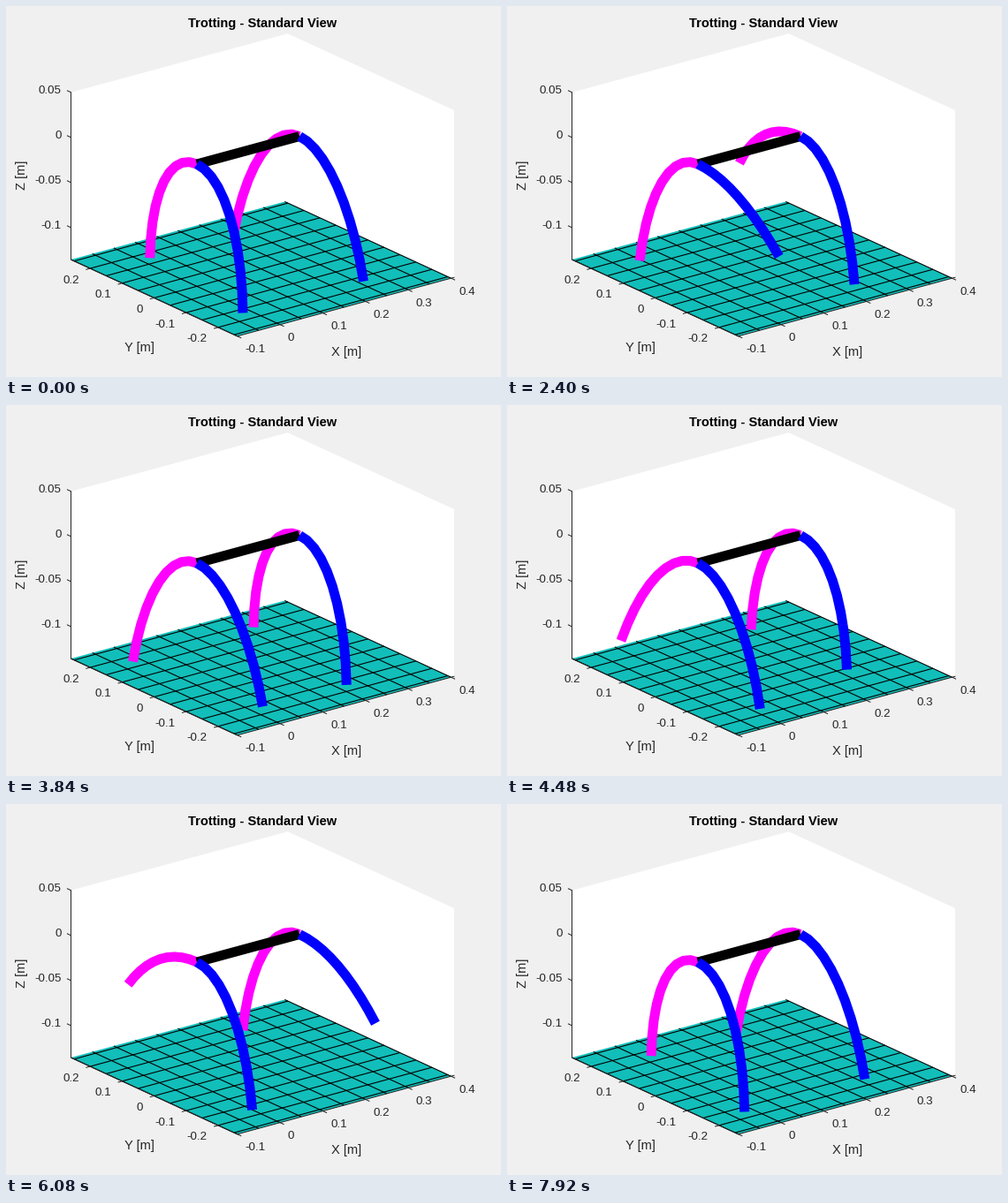
Animation of 560x420 px, one loop 8 s. Source, as a matplotlib script:

```python
import numpy as np
import matplotlib.pyplot as plt
from matplotlib.animation import FuncAnimation

W, H, DPI = 560, 420, 80
PT = 72 / DPI  # points per pixel
FRAMES, INTERVAL = 100, 80

# Plot box: a unit cube seen from azimuth -37.5, elevation 30, stretched to fit
X_LIM, Y_LIM, Z_LIM = (-0.1, 0.407), (-0.26, 0.26), (-0.1355, 0.05)
AZ, EL = np.radians([37.5, 30])
LEFT, TOP, BOX_W, BOX_H = 73.5, 31.2, 433.4, 342.6
SX = BOX_W / (np.cos(AZ) + np.sin(AZ))
SY = BOX_H / ((np.cos(AZ) + np.sin(AZ)) * np.sin(EL) + np.cos(EL))
EX = SX * np.cos(AZ), -SY * np.sin(AZ) * np.sin(EL)
EY = -SX * np.sin(AZ), -SY * np.cos(AZ) * np.sin(EL)
EZ = -SY * np.cos(EL)
FRONT = LEFT - EY[0], TOP + BOX_H

# Robot, in metres
BODY, LEG = 0.24, 0.238
HEIGHT, LIFT = 0.135, 0.073
STRIDE, SWEEP = 0.0207, 0.027
SEGMENTS = 10
BENDS = np.linspace(0.01, 2, 400)
DROPS = LEG * (1 - np.cos(BENDS)) / BENDS

INK, TEAL = "#262626", "#12beb9"
MAGENTA, BLUE = "#ff00ff", "#0000ff"


def project(x, y, z):
    a = (np.asarray(x) - X_LIM[0]) / (X_LIM[1] - X_LIM[0])
    b = (np.asarray(y) - Y_LIM[0]) / (Y_LIM[1] - Y_LIM[0])
    c = (np.asarray(z) - Z_LIM[0]) / (Z_LIM[1] - Z_LIM[0])
    return (FRONT[0] + a * EX[0] + b * EY[0],
            FRONT[1] + a * EX[1] + b * EY[1] + c * EZ)


fig = plt.figure(figsize=(W / DPI, H / DPI), dpi=DPI, facecolor="#f0f0f0")
ax = fig.add_axes([0, 0, 1, 1])
ax.set_xlim(0, W)
ax.set_ylim(H, 0)
ax.axis("off")


def line(xs, ys, color, width, z, cap="butt"):
    return ax.plot(xs, ys, color=color, lw=width * PT, zorder=z,
                   solid_capstyle=cap, solid_joinstyle="round")[0]


def label(x, y, text, size=13.33, color=INK, **kw):
    ax.text(x, y, text, fontsize=size * PT, color=color,
            family="Liberation Sans", zorder=9, **kw)


def tick(point, along):
    d = np.array(along) / np.hypot(*along) * 5
    line([point[0], point[0] + d[0]], [point[1], point[1] + d[1]], INK, 1, 3)


def draw_box():
    (x0, x1), (y0, y1), (z0, z1) = X_LIM, Y_LIM, Z_LIM
    walls = project([x0, x0, x1, x1, x1, x0], [y1, y1, y1, y0, y0, y0],
                    [z0, z1, z1, z1, z0, z0])
    ax.fill(*walls, color="white", lw=0, zorder=0)

    # The ground runs past the box in y, so its y edges carry no grid line
    x_end = 0.4
    floor = project([x0, x_end, x_end, x0], [y0, y0, y1, y1], [z0] * 4)
    ax.fill(*floor, color=TEAL, lw=0, zorder=1)
    for x in np.linspace(x0, x_end, 11):
        line(*project([x, x], [y0, y1], [z0, z0]), "black", 1.1, 2)
    for y in np.linspace(-0.25, 0.25, 11):
        line(*project([x0, x_end], [y, y], [z0, z0]), "black", 1.1, 2)

    line(*project([x0, x0, x0, x1], [y1, y1, y0, y0], [z1, z0, z0, z0]),
         INK, 1, 3, "projecting")


def draw_labels():
    x0, y0 = X_LIM[0], Y_LIM[0]
    z0 = Z_LIM[0]
    for x in np.arange(-1, 5) / 10:
        p = project(x, y0, z0)
        tick(p, (-EY[0], -EY[1]))
        label(p[0] + 8.7, p[1] + 15.5, f"{x:g}", ha="left", va="center")
    for y in np.arange(-2, 3) / 10:
        p = project(x0, y, z0)
        tick(p, (-EX[0], -EX[1]))
        label(p[0] - 12.5, p[1] + 13.5, f"{y:g}", ha="right", va="center")
    for z in (0.05, 0, -0.05, -0.1):
        p = project(x0, Y_LIM[1], z)
        tick(p, EY)
        label(62.5, p[1] - 2, f"{z:g}", ha="right", va="center")
    label(385, 396, "X [m]", 14.67, ha="center", va="baseline")
    label(151, 391, "Y [m]", 14.67, ha="center", va="baseline")
    label(18, 191.5, "Z [m]", 14.67, ha="center", va="center", rotation=90)
    label(289.8, 24, "Trotting - Standard View", 14.67, "black",
          ha="center", va="baseline", weight="bold")


def foot_offset(phase):
    """Foot travel and depth below the hip: swing first, then stance."""
    s = 2 * (phase % 1)
    if s >= 1:
        return STRIDE * (3 - 2 * s), HEIGHT
    travel = STRIDE * (2 * s - 1) - SWEEP * np.sin(2 * np.pi * s)
    return travel, HEIGHT - LIFT * np.sin(np.pi * s) ** 1.4


def leg_curve(hip, side, phase):
    """Arc of fixed length that leaves the hip sideways and bends to the foot."""
    travel, depth = foot_offset(phase)
    drop = np.hypot(travel, depth)
    bend = np.interp(drop, DROPS, BENDS)
    t = np.linspace(0, bend, SEGMENTS + 1)
    out = LEG / bend * np.sin(t)
    down = LEG / bend * (1 - np.cos(t))
    return project(hip + down * travel / drop, side * out, -down * depth / drop)


draw_box()
draw_labels()
line(*project([0, BODY], [0, 0], [0, 0]), "black", 11, 5)

# (hip x, side, phase offset, artist); diagonal legs move together
legs = [(hip, side, offset, line([], [], color, 11, z))
        for hip, side, offset, color, z in (
            (BODY, 1, 0, MAGENTA, 4), (0, 1, 0.5, MAGENTA, 4),
            (BODY, -1, 0.5, BLUE, 6), (0, -1, 0, BLUE, 6))]


def update(i):
    for hip, side, offset, artist in legs:
        artist.set_data(*leg_curve(hip, side, (i + 1) / FRAMES + offset))
    return [leg[-1] for leg in legs]


anim = FuncAnimation(fig, update, frames=FRAMES, interval=INTERVAL,
                     repeat=True, repeat_delay=0)
plt.show()
```
